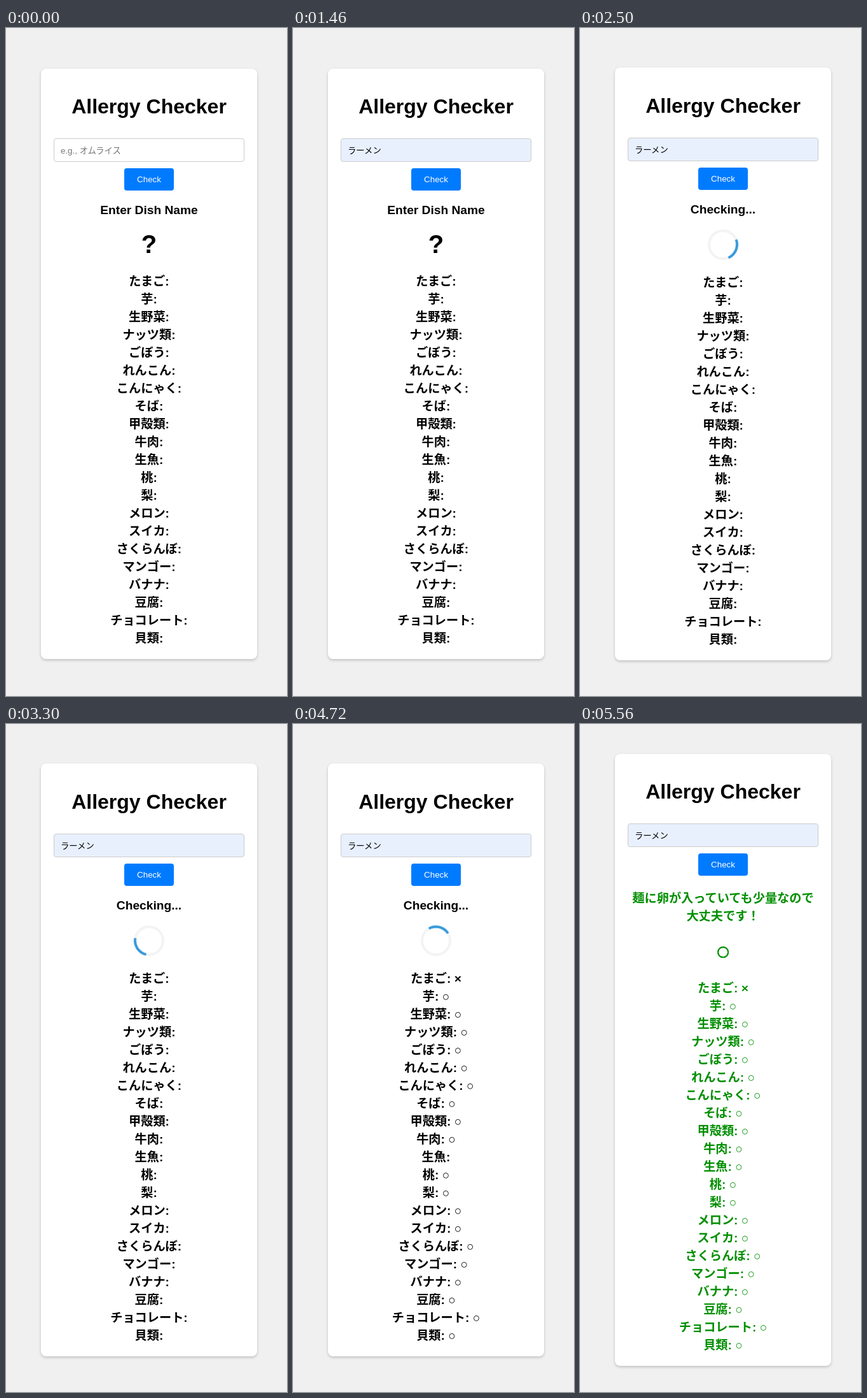
An HTML page that plays this animation: 442 by 1048 pixels, repeating every 6320 ms.

```html
<!DOCTYPE html>
<html lang="ja">
<head>
<meta charset="utf-8">
<title>Allergy Checker</title>
<style>
  :root { --loop: 6320ms; }
  html, body { margin: 0; width: 100%; height: 100%; overflow: hidden; }
  body {
    position: relative;
    background: #f0f0f0;
    color: #000;
    font: bold 19.2px "Liberation Sans", "Noto Sans CJK JP", "Noto Sans CJK", Arial, sans-serif;
    text-align: center;
  }
  /* the page is slightly larger than the visible stage */
  .scene {
    position: absolute; left: 0; top: 0; width: 450px; height: 1054px;
    display: flex; align-items: center; justify-content: center;
    opacity: 0;
    animation: var(--loop) step-end infinite;
  }
  .card {
    box-sizing: border-box; width: 340px; padding: 20px;
    background: #fff;
    border-radius: 8px;
    box-shadow: 0 2px 4px rgba(0, 0, 0, .2);
    white-space: nowrap;
  }
  .title { margin: 21.44px 0 31.44px; font-size: 32px; }
  .field, .button { box-sizing: border-box; border-radius: 4px; font-size: 13.333px; font-weight: normal; }
  .field {
    display: flex; align-items: center;
    height: 37px; padding: 0 10px;
    border: 1px solid #ccc;
    color: #757575;
  }
  .filled .field { background: #e8f0fe; color: #000; }
  .button {
    width: 78px; height: 35px; margin: 10px auto 20px;
    background: #007bff; color: #fff;
    line-height: 35px;
    animation: press var(--loop) linear infinite;
  }
  .symbol { margin: 20px 0; font-size: 40px; }
  .spinner {
    box-sizing: border-box; width: 48px; height: 48px; margin: 20px auto;
    border: 4px solid #f3f3f3; border-top-color: #3498db; border-radius: 50%;
    animation: spin var(--loop) infinite;
  }
  .done .status, .done .symbol, .done .list { color: #008f00; }
  .done .symbol { -webkit-text-stroke: .6px; }

  .idle { animation-name: show-idle; }
  .typed { animation-name: show-typed; }
  .checking { animation-name: show-checking; }
  .marked { animation-name: show-marked; }
  .done { animation-name: show-done; }

  @keyframes show-idle { 0% { opacity: 1; } 20.57%, 100% { opacity: 0; } }
  @keyframes show-typed { 0% { opacity: 0; } 20.57% { opacity: 1; } 27.215%, 100% { opacity: 0; } }
  @keyframes show-checking { 0% { opacity: 0; } 27.215% { opacity: 1; } 60.127%, 100% { opacity: 0; } }
  @keyframes show-marked { 0% { opacity: 0; } 60.127% { opacity: 1; } 86.709%, 100% { opacity: 0; } }
  @keyframes show-done { 0% { opacity: 0; } 86.709%, 100% { opacity: 1; } }

  @keyframes press {
    0%, 23.4% { background: #007bff; }
    25.3%, 30.1% { background: #0056b3; }
    32.9%, 100% { background: #007bff; }
  }
  /* one step every 20 ms */
  @keyframes spin {
    0% { transform: rotate(2deg); animation-timing-function: step-end; }
    27.215% { transform: rotate(2deg); animation-timing-function: steps(188); }
    86.709%, 100% { transform: rotate(2273deg); }
  }
</style>
</head>
<body>
<script>
  const foods = ("たまご 芋 生野菜 ナッツ類 ごぼう れんこん こんにゃく そば 甲殻類 牛肉 生魚 " +
    "桃 梨 メロン スイカ さくらんぼ マンゴー バナナ 豆腐 チョコレート 貝類").split(" ");

  const blank = () => "";
  const mark = food => food === "たまご" ? " ×" : " ○";
  const markEarly = food => food === "生魚" ? "" : mark(food);

  const symbol = text => `<div class="symbol">${text}</div>`;
  const spinner = '<div class="spinner"></div>';

  function addScene(name, status, indicator, result) {
    const filled = name !== "idle";
    const rows = foods.map(food => `<div>${food}:${result(food)}</div>`).join("");
    document.body.insertAdjacentHTML("beforeend", `
      <div class="scene ${name} ${filled ? "filled" : ""}">
        <div class="card">
          <h1 class="title">Allergy Checker</h1>
          <div class="field">${filled ? "ラーメン" : "e.g., オムライス"}</div>
          <div class="button">Check</div>
          <div class="status">${status}</div>
          ${indicator}
          <div class="list">${rows}</div>
        </div>
      </div>`);
  }

  addScene("idle", "Enter Dish Name", symbol("?"), blank);
  addScene("typed", "Enter Dish Name", symbol("?"), blank);
  addScene("checking", "Checking...", spinner, blank);
  addScene("marked", "Checking...", spinner, markEarly);
  addScene("done", "麺に卵が入っていても少量なので<br>大丈夫です！", symbol("○"), mark);
</script>
</body>
</html>
```
